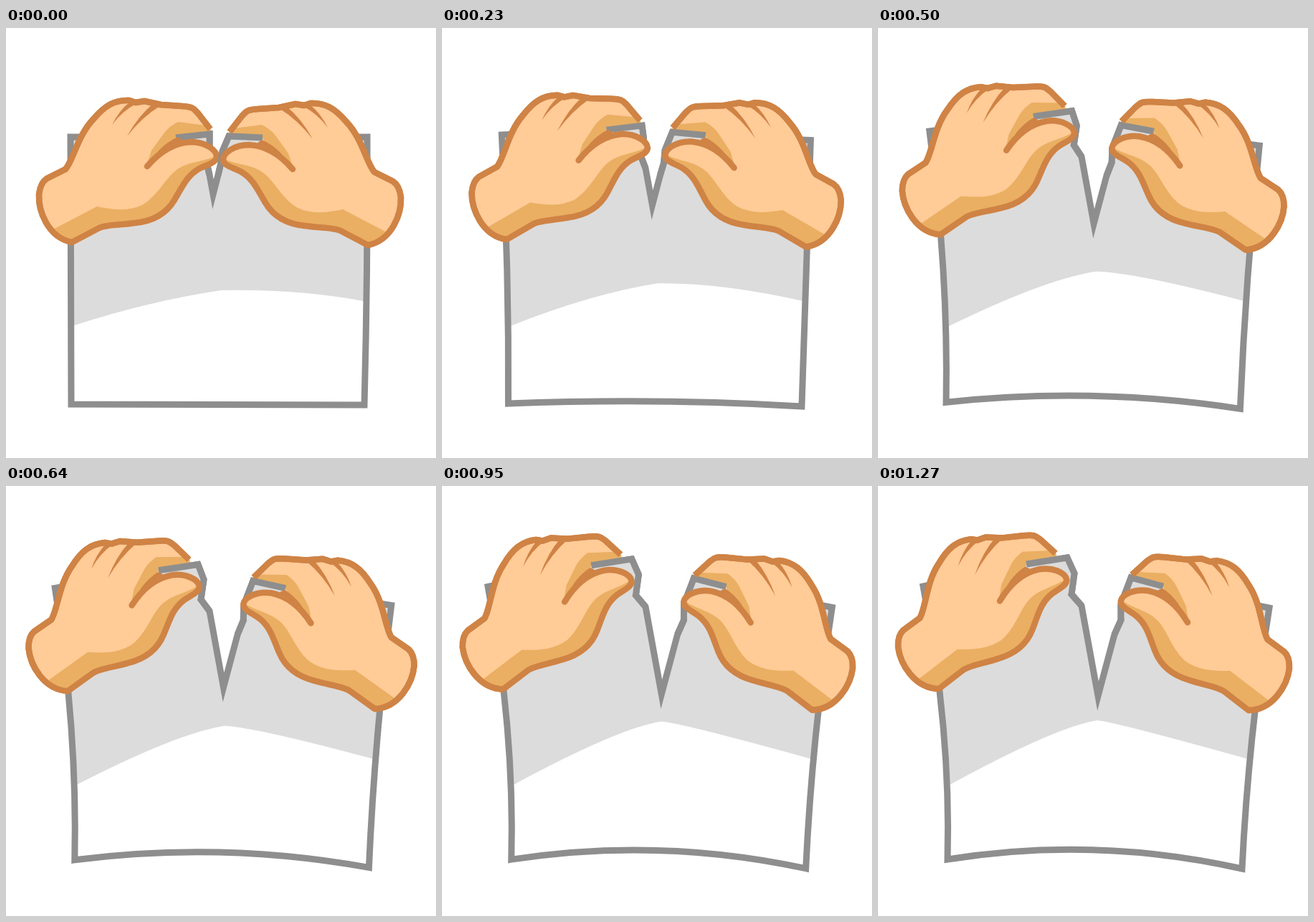
These frames come from a looping animation (600x600 px, 1.99 s). An HTML page with a canvas:

```html
<!DOCTYPE html>
<html lang="en">
<head>
<meta charset="utf-8">
<title>Tearing paper</title>
<style>
html, body { margin: 0; width: 100%; height: 100%; overflow: hidden; background: #fff; }
canvas { display: block; width: 600px; height: 600px; }
</style>
</head>
<body>
<canvas id="stage" width="600" height="600"></canvas>
<script>
const ctx = document.getElementById('stage').getContext('2d');
const LOOP = 1990, STEPS = 28, STEP = 1000 / 22;
const SKIN = '#ffcb97', SHADE = '#eaaf62', LINE = '#cf8345';
const PAPER = '#dcdcdc', EDGE = '#8e8e8e';

// Each part lists its points in the closed and in the torn pose.
const sheet = {
  left: [[[90, 152], [91, 340], [91, 525]], [[63, 140], [102, 340], [97, 521]]],
  right: [[[504, 152], [505, 340], [500, 526]], [[546, 170], [517, 350], [508, 534]]],
  arch: [[[300, 525]], [[302, 488]]],
  tip: [[[289, 232]], [[307, 293]]],
  flapL: [
    [[237, 153], [284, 148], [284, 165], [280, 188], [284, 205]],
    [[207, 109], [264, 100], [274, 122], [270, 151], [284, 167]]],
  flapR: [
    [[358, 153], [311, 151], [302, 172], [300, 188], [296, 205]],
    [[398, 140], [353, 128], [339, 165], [339, 187], [330, 207]]],
  crest: [
    [[95, 415], [200, 381], [300, 366], [410, 364], [504, 382]],
    [[98, 418], [248, 336], [306, 327], [330, 329], [520, 382]]]
};

const backLine = 'M92 299C58 292 45 255 46 232Q48 216 57 210L83 197' +
  'C94 184 100 150 122 127C138 108 152 100 172 101L181 104L193 102' +
  'L216 107L245 109C262 110 262 113 268 119L285 141';
const thumbLine = 'C215 172 235 160 258 159C278 159 294 170 294 180' +
  'C293 188 282 190 270 196C252 206 246 222 235 240' +
  'C222 262 200 270 180 272C160 275 140 274 130 279L92 299';
const hand = {
  back: new Path2D(backLine),
  thumb: new Path2D('M197 193' + thumbLine),
  body: new Path2D(backLine + 'L237 153L197 193' + thumbLine + 'Z'),
  finger: new Path2D('M286 142L279 136L240 131Q228 137 221 146L203 171L196 192L240 154L285 149Z'),
  palm: new Path2D('M62 283L127 249C150 254 170 256 190 247' +
    'C212 234 222 210 238 198C256 185 275 188 296 177L310 320L60 320Z'),
  creases: new Path2D('M173 103Q158 115 148 135Q163 115 183 105Z' +
    'M206 105Q185 122 169 151Q190 124 216 108Z'),
  fold: new Path2D('M195 194L214 170Q226 158 240 152L246 156L236 163L220 177Z')
};

const lerp = (a, b, p) => a + (b - a) * p;
const blend = ([a, b], p) => a.map((q, i) => [lerp(q[0], b[i][0], p), lerp(q[1], b[i][1], p)]);

function ease(x) {
  let lo = 0, hi = 1;
  for (let i = 0; i < 30; i++) {
    const s = (lo + hi) / 2;
    if (0.75 * s * (1 - s) + s ** 3 < x) lo = s; else hi = s;
  }
  return 0.3 * lo * (1 - lo) ** 2 + 3 * lo * lo * (1 - lo) + lo ** 3;
}

function progress(t) {
  let k = Math.floor(t / STEP) + 1;
  while (Math.round(k * STEP / 10) * 10 > t) k--;
  return ease(Math.min(k, STEPS) / STEPS);
}

function trace(points) {
  ctx.beginPath();
  points.forEach(q => ctx.lineTo(...q));
}

function paint(path, color) {
  ctx.fillStyle = color;
  ctx.fill(path);
}

function strokeEdge() {
  ctx.strokeStyle = EDGE;
  ctx.lineWidth = 9;
  ctx.lineCap = 'butt';
  ctx.lineJoin = 'miter';
  ctx.miterLimit = 20;
  ctx.stroke();
}

function outline(path, cap) {
  ctx.strokeStyle = LINE;
  ctx.lineWidth = 8.5;
  ctx.lineCap = cap;
  ctx.lineJoin = 'round';
  ctx.stroke(path);
}

function traceSheet(s) {
  trace([s.left[0], ...s.flapL, s.tip[0], ...[...s.flapR].reverse(), s.right[0]]);
  ctx.quadraticCurveTo(...s.right[1], ...s.right[2]);
  ctx.quadraticCurveTo(...s.arch[0], ...s.left[2]);
  ctx.quadraticCurveTo(...s.left[1], ...s.left[0]);
  ctx.closePath();
}

function drawSheet(s) {
  ctx.save();
  traceSheet(s);
  ctx.clip();
  const [start, c1, peak, c2, end] = s.crest;
  trace([[0, 0], [0, start[1]], start]);
  ctx.quadraticCurveTo(...c1, ...peak);
  ctx.quadraticCurveTo(...c2, ...end);
  ctx.lineTo(600, end[1]);
  ctx.lineTo(600, 0);
  ctx.fillStyle = PAPER;
  ctx.fill();
  ctx.restore();
  traceSheet(s);
  strokeEdge();
}

function drawFlap(flap, inner) {
  trace([...flap.slice(0, 4), inner]);
  ctx.fillStyle = PAPER;
  ctx.fill();
  trace(flap);
  strokeEdge();
}

// Fingers lie behind the flap, thumb and palm in front of it.
function drawHand(p, mirrored, flap) {
  const place = draw => {
    ctx.save();
    if (mirrored) {
      ctx.translate(lerp(505, 517, p), lerp(303, 313, p));
      ctx.scale(-1, 1);
    } else {
      ctx.translate(lerp(92, 85, p), lerp(299, 283, p));
    }
    ctx.rotate(-p * Math.PI / 18);
    ctx.translate(-92, -299);
    draw();
    ctx.restore();
  };
  place(() => {
    paint(hand.body, SKIN);
    paint(hand.finger, SHADE);
    paint(hand.creases, LINE);
    outline(hand.back, 'butt');
  });
  const [x, y] = flap[0];
  drawFlap(flap, [x + (mirrored ? 8 : -8), y + 25]);
  place(() => {
    paint(hand.fold, LINE);
    paint(hand.thumb, SKIN);
    ctx.save();
    ctx.clip(hand.body);
    paint(hand.palm, SHADE);
    ctx.restore();
    outline(hand.back, 'butt');
    outline(hand.thumb, 'round');
  });
}

function render(now) {
  const p = progress(now % LOOP);
  const s = {};
  for (const key in sheet) s[key] = blend(sheet[key], p);
  ctx.fillStyle = '#fff';
  ctx.fillRect(0, 0, 600, 600);
  drawSheet(s);
  drawHand(p, false, s.flapL);
  drawHand(p, true, s.flapR);
}

const begin = performance.now();
function tick() {
  render(performance.now() - begin);
  requestAnimationFrame(tick);
}
tick();
</script>
</body>
</html>
```
